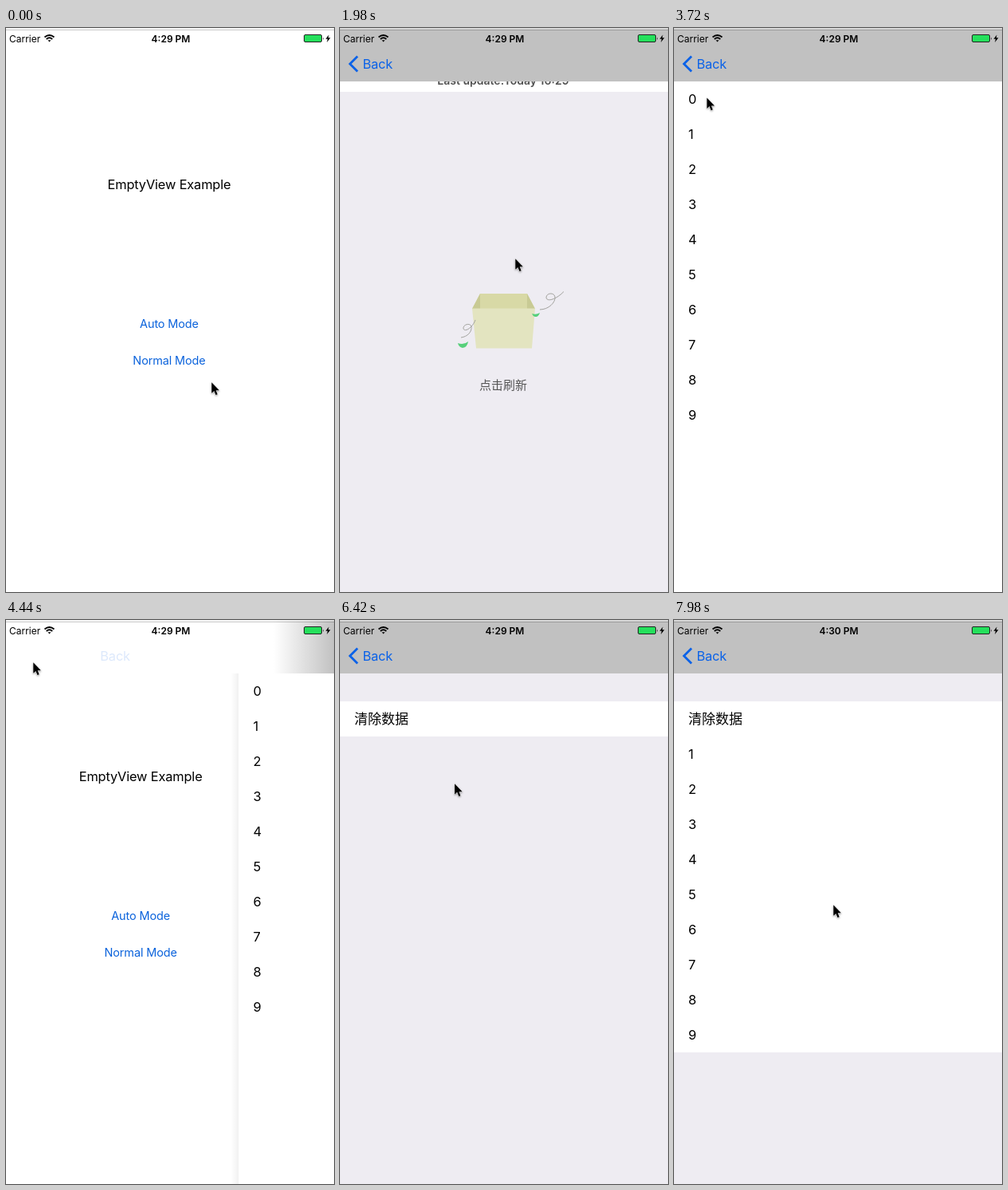
Recreate the animation shown at these times as an HTML page. Size 412 px wide and 707 px high, loop 8000 ms.

```html
<!DOCTYPE html>
<html lang="en">
<head>
<meta charset="utf-8">
<title>EmptyView Example</title>
<style>
  html, body { margin: 0; width: 100%; height: 100%; overflow: hidden; background: #fff; }
  svg { display: block; width: 412px; height: 707px; }
  text { font: 16.4px Inter, "Noto Sans CJK SC", sans-serif; letter-spacing: -.01em; white-space: pre; }
  .mid { text-anchor: middle; }
  .link { font-size: 14.5px; fill: #0b63dc; }
  .cjk { font-family: "Noto Sans CJK SC", "Noto Sans CJK", sans-serif; letter-spacing: 0; }
  .status { font-size: 12px; letter-spacing: 0; }
  .refresh { font-size: 14px; font-weight: 600; fill: #505050; letter-spacing: 0; }
  .blue { fill: #0b62e8; }
</style>
</head>
<body>
<svg viewBox="0 0 412 707">
  <defs>
    <linearGradient id="navFill" gradientUnits="userSpaceOnUse" y1="0" y2="0">
      <stop offset="0" stop-color="#c1c1c1" stop-opacity="0"/>
      <stop offset="1" stop-color="#c1c1c1"/>
    </linearGradient>
    <linearGradient id="edgeFill">
      <stop offset="0" stop-opacity="0"/>
      <stop offset="1" stop-opacity=".2"/>
    </linearGradient>
  </defs>
  <rect width="412" height="707" fill="#fff"/>

  <g id="home">
    <text class="mid" x="205" y="202">EmptyView Example</text>
    <text class="mid link" id="autoLink" x="205" y="376.3">Auto Mode</text>
    <text class="mid link" id="normalLink" x="205" y="422.3">Normal Mode</text>
  </g>

  <g id="detail">
    <rect id="edge" x="-10" y="67" width="10" height="640" fill="url(#edgeFill)"/>
    <rect id="page" y="67" width="412" height="640"/>
    <g id="list">
      <rect id="cells" width="412" fill="#fff"/>
      <rect id="pressed" width="412" height="44" fill="#d9d9d9"/>
    </g>
    <g id="header">
      <text class="mid refresh" id="hint" x="205" y="18"></text>
      <text class="mid refresh" x="205" y="45">Last update:Today 16:29</text>
      <path id="arrow" d="M97 13V39M90 32L97 39L104 32" fill="none" stroke="#777" stroke-width="2"/>
      <g id="spinner"></g>
    </g>
    <g id="empty">
      <rect y="67" width="412" height="640" fill="#eeecf2"/>
      <path d="M176 320H235L245 339H166Z" fill="#d8d9a6"/>
      <path d="M176 320V339H166ZM235 320V339H245Z" fill="#c8ca94"/>
      <path d="M166 338.5H245L241 388.5H171Z" fill="#e3e4c0"/>
      <g fill="none" stroke="#a3a39f">
        <path d="M251 340C262 340 271 331 270 324C269 318 259 319 259 325C260 331 272 327 281 317.500"/>
        <path d="M152 375C160 374 166 368 165 361C163 356 154 359 155 364C157 369 167 362 170 353"/>
      </g>
      <path d="M148 382Q155 385 161 380Q160 387 154 388Q149 387 148 382ZM241 345Q246 347 251 344Q249 350 245 349Q242 348 241 345Z" fill="#57d07b"/>
      <text class="mid cjk" x="205" y="439.600" style="font-size:15px;font-weight:500" fill="#555">点击刷新</text>
    </g>
  </g>

  <rect id="nav" width="412" height="67" fill="url(#navFill)"/>
  <path id="chevron" d="M22 35.500L12.500 45L22 54.500" fill="none" stroke="#0b62e8" stroke-width="2.8"/>
  <text id="back" class="blue" y="51">Back</text>

  <rect width="412" height="2" fill="#eee" opacity=".5"/>
  <rect y="2" width="412" height="1" opacity=".2"/>
  <text class="status" x="4" y="17.700">Carrier</text>
  <g fill="none" stroke="#000" stroke-width="1.9">
    <path d="M48.500 11.500Q54.500 6.500 60.500 11.500M50.800 14Q54.500 10.700 58.200 14"/>
    <path d="M52.500 15.200H56.500L54.500 17.500Z" fill="#000" stroke="none"/>
  </g>
  <text class="mid status" id="clock" x="207" y="17.700" style="font-weight:600"></text>
  <rect x="374.500" y="8.500" width="22" height="9" rx="1.500" fill="#25e05c" stroke="#222"/>
  <path d="M398 11.500Q399.500 13 398 15Z"/>
  <path d="M405.500 8.500L401.500 13.800H404L403 18L407.500 12.300H404.800Z"/>

  <path id="cursor" d="M.3 .3V13.800L3.400 10.900L5.500 16.100L7.700 15.200L5.700 10.300H9.900Z" stroke="#fff" stroke-width=".8"
        paint-order="stroke" style="filter:drop-shadow(0 1px 1px #0006)"/>
</svg>
<script>
const LOOP = 8000, W = 412, TOP = 67, ROW = 44, HEADER = 54;
const AUTO_PUSH = 900, POP = 4328, SWITCH = 5000, NORMAL_PUSH = 5727;
const DRAG_Y = 265, RELEASE = 2320, LOADED = 2740, CLOSE = 2780, SETTLE = 400;
const CLEAR = 7020, RELOAD = 7860;

// time, x, y of the pointer
const pointerPath = [
  [30, 258, 444], [480, 187, 368], [1020, 187, 368], [1620, 220, DRAG_Y], [1860, 220, DRAG_Y],
  [1980, 220, 289], [2260, 220, 488], [2340, 220, 488], [2640, 220, 441], [2820, 220, 441],
  [3330, 110, 333], [3900, 20, 12], [4080, 34, 53], [4560, 34, 53], [5010, 58, 140],
  [5520, 211, 425], [5900, 211, 425], [6690, 119, 124], [7020, 119, 124], [7230, 180, 147],
  [7290, 180, 147], [7780, 200, 357]
];

const el = {};
document.querySelectorAll('[id]').forEach(n => el[n.id] = n);
const set = (n, attrs) => { for (const k in attrs) n.setAttribute(k, attrs[k]); };
const make = (tag, parent, attrs) => {
  const n = document.createElementNS('http://www.w3.org/2000/svg', tag);
  set(n, attrs);
  return parent.appendChild(n);
};
const show = (n, on) => { n.style.display = on ? '' : 'none'; };
const move = (n, x, y) => set(n, { transform: `translate(${x} ${y})` });
const within = (t, a, b) => t >= a && t < b;
const smooth = p => { p = Math.min(1, Math.max(0, p)); return p * p * (3 - 2 * p); };

const rows = Array.from({ length: 10 }, (_, i) => make('text', el.list, { x: 18, y: i * ROW + 28 }));
rows.forEach((row, i) => { row.textContent = i; });
const spokes = Array.from({ length: 12 }, (_, i) => make('rect', el.spinner, {
  x: 96, y: 17, width: 2, height: 5.5, rx: 1, fill: '#666', transform: `rotate(${i * 30} 97 27)`
}));

// critically damped spring: share of the way still left
function left(ms) {
  const u = Math.max(0, ms) * .022;
  return (1 + u) * Math.exp(-u);
}

function pageX(t) {
  if (t < POP) return W * left(t - AUTO_PUSH);
  if (t < SWITCH) return W * (1 - left(t - POP));
  return W * left(t - NORMAL_PUSH);
}

function pointer(t) {
  const i = pointerPath.findIndex(k => k[0] > t);
  if (i < 1) return pointerPath[i ? pointerPath.length - 1 : 0].slice(1);
  const [a, x, y] = pointerPath[i - 1], [b, x2, y2] = pointerPath[i];
  const p = smooth((t - a) / (b - a));
  return [x + (x2 - x) * p, y + (y2 - y) * p];
}

const rubber = d => (1 - 1 / (Math.max(0, d) * .55 / 736 + 1)) * 736;

function pullOffset(t) {
  if (t < 1860 || t > CLOSE + SETTLE) return 0;
  if (t < RELEASE) return rubber(pointer(t)[1] - DRAG_Y);
  if (t < CLOSE) {
    const from = rubber(pointer(RELEASE)[1] - DRAG_Y);
    return from + (HEADER - from) * smooth((t - RELEASE) / SETTLE);
  }
  return HEADER * (1 - smooth((t - CLOSE) / SETTLE));
}

function drawHeader(t, off) {
  const loading = t >= RELEASE, ready = off >= HEADER;
  show(el.header, off > 0);
  move(el.header, 0, TOP + off - HEADER);
  el.hint.textContent = loading ? 'Loading...' : ready ? 'Release to refresh' : 'Pull down to refresh';
  show(el.arrow, !loading);
  show(el.spinner, loading);
  set(el.arrow, { transform: `rotate(${ready ? 180 : 0} 97 26)` });
  const head = Math.floor(t * .012) + 3;
  spokes.forEach((s, i) => set(s, { opacity: Math.max(.25, .9 - ((head - i) % 12 + 12) % 12 * .1) }));
}

function drawDetail(t, x) {
  const auto = t < SWITCH, off = pullOffset(t);
  const count = auto || t >= RELOAD ? 10 : 1;
  const isEmpty = auto ? t < LOADED : within(t, CLEAR, RELOAD);
  show(el.detail, x < 411.5);
  move(el.detail, x, 0);
  set(el.edge, { opacity: within(t, POP, SWITCH) ? 1 - x / W : 1 });
  set(el.page, { fill: auto ? '#fff' : '#eeecf2' });
  move(el.list, 0, auto ? TOP + off : 102);
  show(el.list, !isEmpty);
  set(el.cells, { height: count * ROW });
  show(el.pressed, within(t, 6950, CLEAR));
  rows.forEach((row, i) => show(row, i < count));
  rows[0].textContent = auto ? '0' : '清除数据';
  set(rows[0], { class: auto ? '' : 'cjk', style: auto ? '' : 'font-size:17px' });
  show(el.empty, isEmpty);
  move(el.empty, 0, off);
  drawHeader(t, off);
}

function drawNav(t, x) {
  const popping = within(t, POP, SWITCH);
  const start = x * (popping ? 1.15 : 1.02);
  show(el.nav, x < 411.5);
  set(el.navFill, { x1: start, x2: start + x * .26 });
  const fade = Math.pow(Math.max(0, 1 - x / W), 1.6) * (within(t, 4200, POP) ? .3 : 1);
  set(el.back, { x: 28.5 + x * x * .00105, opacity: fade });
  set(el.chevron, { opacity: popping ? fade * (1 - smooth(x / 200)) : fade });
}

function draw(t) {
  const x = pageX(t);
  move(el.home, -.3 * (W - x), 0);
  set(el.autoLink, { opacity: within(t, 830, 1500) ? .3 : 1 });
  set(el.normalLink, { opacity: t > 5650 ? .3 : 1 });
  drawDetail(t, x);
  drawNav(t, x);
  el.clock.textContent = t < CLEAR ? '4:29 PM' : '4:30 PM';
  move(el.cursor, ...pointer(t));
}

const begin = performance.now();
function tick() {
  draw((performance.now() - begin) % LOOP);
  requestAnimationFrame(tick);
}
tick();
</script>
</body>
</html>
```
